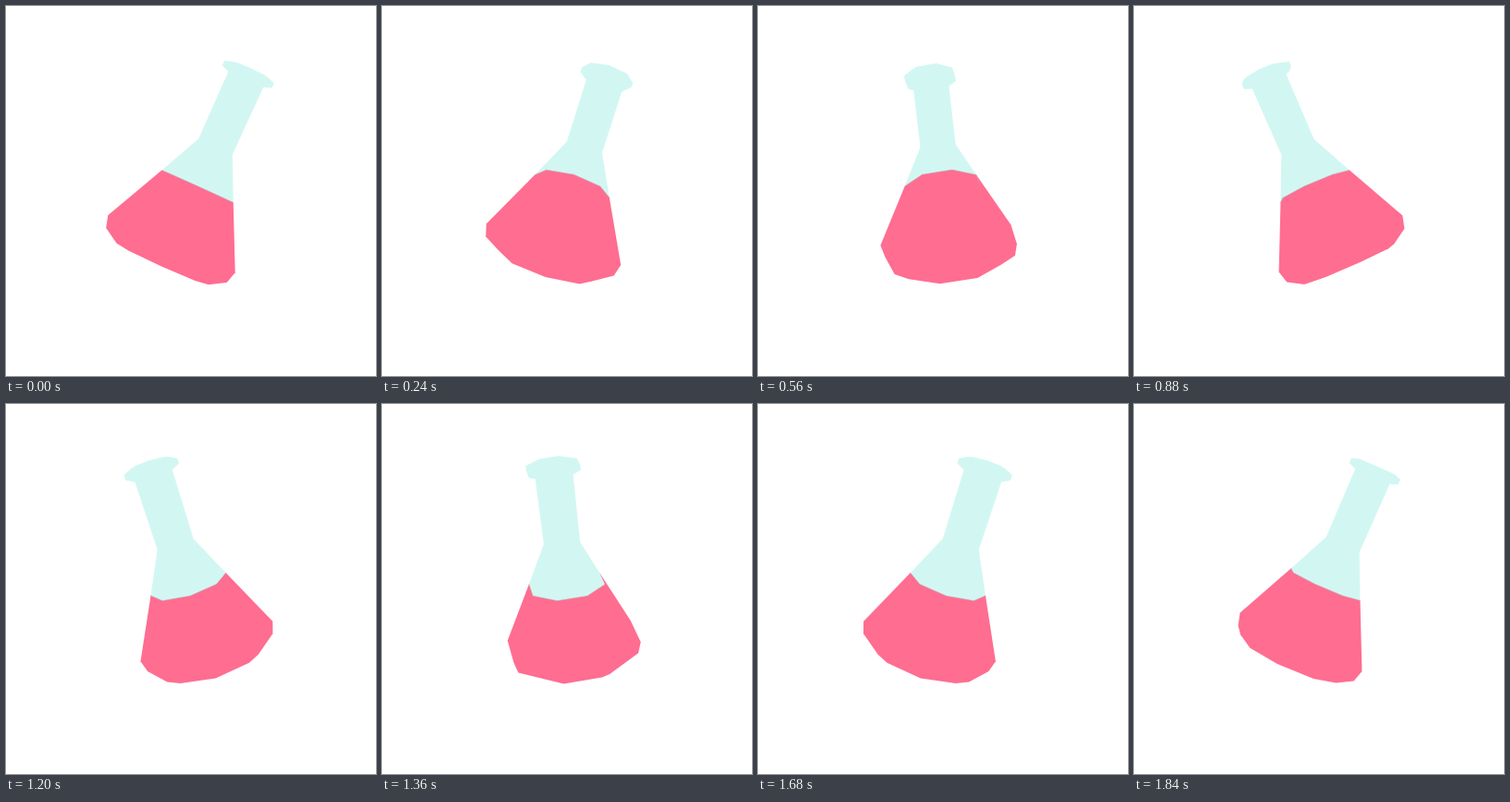
An HTML page with a canvas that plays this animation: 400 by 400 pixels, repeating every 1920 ms.

```html
<!DOCTYPE html>
<html lang="en">
<head>
<meta charset="utf-8">
<title>Swirling flask</title>
<style>
html, body { margin: 0; width: 100%; height: 100%; overflow: hidden; background: #fff; }
canvas { display: block; }
</style>
</head>
<body>
<canvas id="stage" width="400" height="400"></canvas>
<script>
const ctx = document.getElementById('stage').getContext('2d');
const LOOP = 1920, STEP = 80;
const TILT = 24.3 * Math.PI / 180, SIDES = 8;
const CAM = 1650, CX = 201.2, CY = 200, DROP = 8;
const GLASS = '#d2f7f2', LIQUID = '#ff6d91', EDGE = 'rgba(205,160,172,0.6)';

// Rings are [radius, height along the axis], measured from the pivot.
const SURFACE = [42.4, 14.3];
const LIP = [[22, 152.5], [29.5, 150], [29.5, 144.3], [22, 141.5]];
const NECK = [[20.8, 146], [20.2, 61.3]];
const SHOULDER = [[20.2, 61.3], SURFACE];
const BODY = [SURFACE, [75.4, -54], [71.6, -67.5], [54.5, -77.8]];

const sinT = Math.sin(TILT), cosT = Math.cos(TILT);

function project(x, h, z, turn) {
  const tx = x * cosT + h * sinT;
  const ty = h * cosT - x * sinT;
  const depth = z * Math.cos(turn) - tx * Math.sin(turn);
  const scale = CAM / (CAM - depth);
  return {
    x: CX + (tx * Math.cos(turn) + z * Math.sin(turn)) * scale,
    y: CY + (DROP - ty) * scale,
    depth
  };
}

function ring([r, h], turn) {
  return Array.from({ length: SIDES }, (_, i) => {
    const a = i * 2 * Math.PI / SIDES;
    return project(r * Math.cos(a), h, r * Math.sin(a), turn);
  });
}

const cross = (o, a, b) => (a.x - o.x) * (b.y - o.y) - (a.y - o.y) * (b.x - o.x);

function halfHull(points) {
  const out = [];
  for (const p of points) {
    while (out.length > 1 && cross(out[out.length - 2], out[out.length - 1], p) <= 0) out.pop();
    out.push(p);
  }
  out.pop();
  return out;
}

function hull(points) {
  const sorted = points.slice().sort((a, b) => a.x - b.x || a.y - b.y);
  return halfHull(sorted).concat(halfHull(sorted.reverse()));
}

function fillSolid(rings, color, turn) {
  ctx.beginPath();
  hull(rings.flatMap(r => ring(r, turn))).forEach(p => ctx.lineTo(p.x, p.y));
  ctx.fillStyle = color;
  ctx.fill();
}

function strokeSurface(turn) {
  const pts = ring(SURFACE, turn);
  const mid = project(0, SURFACE[1], 0, turn).depth;
  ctx.beginPath();
  pts.forEach((p, i) => {
    const q = pts[(i + 1) % SIDES];
    if ((p.depth + q.depth) / 2 > mid) {
      ctx.moveTo(p.x, p.y);
      ctx.lineTo(q.x, q.y);
    }
  });
  ctx.strokeStyle = EDGE;
  ctx.lineWidth = 1;
  ctx.stroke();
}

function draw(time) {
  const turn = 2 * Math.PI * time / LOOP;
  const glass = () => [LIP, NECK, SHOULDER].forEach(s => fillSolid(s, GLASS, turn));
  const liquid = () => fillSolid(BODY, LIQUID, turn);
  const facing = DROP * cosT - CAM * sinT * Math.sin(turn) - SURFACE[1];

  ctx.fillStyle = '#fff';
  ctx.fillRect(0, 0, 400, 400);
  if (facing > 0) { liquid(); glass(); }
  else { glass(); liquid(); }
  strokeSurface(turn);
}

function tick(now) {
  draw(Math.floor(now % LOOP / STEP) * STEP);
  requestAnimationFrame(tick);
}

draw(0);
requestAnimationFrame(tick);
</script>
</body>
</html>
```
